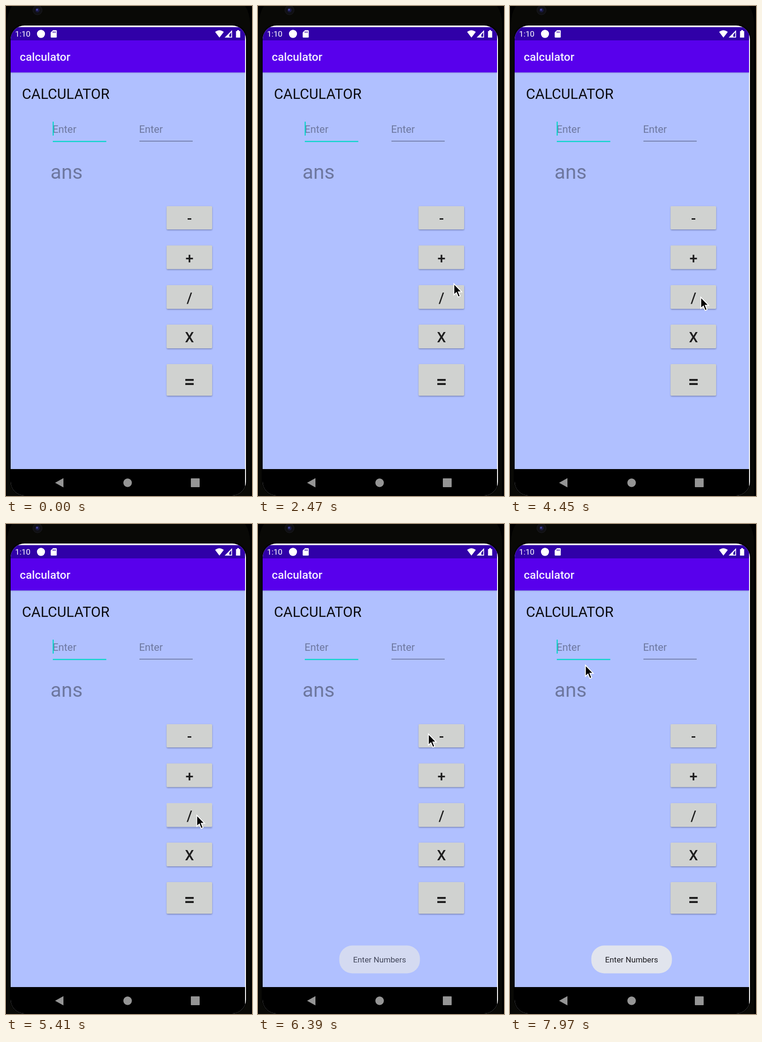
Animation, 531 px wide and 1055 px high, one loop 8 s. Source, as an HTML page:

```html
<!DOCTYPE html>
<html lang="en">
<head>
<meta charset="utf-8">
<title>Calculator demo</title>
<style>
  html, body { margin: 0; width: 100%; height: 100%; overflow: hidden; background: #000; }
  svg { display: block; width: 100vw; height: 100vh; }
  text { font-family: Roboto, "Noto Sans", sans-serif; }
  .medium { font-weight: 500; }
  .hint { fill: #6d779f; }
  .key { fill: #1d1d1d; font-weight: 500; text-anchor: middle; }
</style>
</head>
<body>
<svg viewBox="0 0 531 1055" preserveAspectRatio="none">
  <defs>
    <linearGradient id="barShade" x2="0" y2="1">
      <stop offset="0" stop-color="#4d5796" stop-opacity=".35"/>
      <stop offset="1" stop-color="#4d5796" stop-opacity="0"/>
    </linearGradient>
    <clipPath id="opening"><rect x="10" y="42" width="508" height="1012" rx="30"/></clipPath>
    <filter id="blur" x="-20%" y="-40%" width="140%" height="180%"><feGaussianBlur stdDeviation="1.5"/></filter>
  </defs>

  <!-- Phone body -->
  <rect width="531" height="1055" fill="#000"/>
  <path d="M2 1055V38Q3 14 13 0H516Q526 14 527 38V1055Z" fill="#090906"/>
  <rect x="8" y="39" width="512" height="1016" rx="32" fill="#000"/>
  <circle cx="68" cy="9" r="10" fill="#101014" stroke="#1b1b1e"/>
  <circle cx="68" cy="9" r="4.5" fill="#191944"/>
  <circle cx="67" cy="8" r="2" fill="#4a4ba4"/>

  <!-- The screen leaves a thin white gap at the top and right of the opening -->
  <g clip-path="url(#opening)">
    <rect x="10" y="42" width="508" height="1013" fill="#fff"/>
    <rect x="10" y="143" width="506" height="854" fill="#b0c0ff"/>
    <rect x="10" y="45.5" width="506" height="29" fill="#3000a8"/>
    <rect x="10" y="74" width="506" height="69" fill="#5800ec"/>
    <rect x="10" y="143" width="506" height="3" fill="url(#barShade)"/>
    <rect x="10" y="997" width="506" height="58" fill="#000"/>
  </g>

  <!-- Status bar -->
  <g fill="#fff">
    <text x="19.5" y="66.3" font-size="17.3">1:10</text>
    <circle cx="75.5" cy="60" r="8.7"/>
    <path d="M101.5 52H108Q109.5 52 109.5 53.5V66.5Q109.5 68 108 68H98Q96.5 68 96.5 66.5V57Z"/>
    <path d="M101.5 54.5V58M104 54.5V58M106.5 54.5V58" stroke="#3000a8" stroke-width="1.2"/>
    <path d="M451.5 56Q460.5 48.5 470 56L460.7 68Z"/>
    <path d="M472 68L488 52V68ZM482 62V66.3H486.3V56.5Z" fill-rule="evenodd"/>
    <path d="M496.5 54H499V52H503V54H505.5V68H496.5Z"/>
  </g>

  <text class="medium" x="29.8" y="118.3" font-size="24.6" fill="#f4efff">calculator</text>
  <text x="34.5" y="200.3" font-size="30.8" fill="#0b0b10">CALCULATOR</text>
  <text class="hint" x="100.5" y="273" font-size="22.2">Enter</text>
  <text class="hint" x="287.2" y="273" font-size="22.2">Enter</text>
  <text class="hint" x="96" y="372" font-size="43">ans</text>
  <rect x="101" y="290.5" width="115.5" height="2.4" fill="#08d6ca"/>
  <rect x="288" y="290.3" width="115" height="1.3" fill="#596283"/>
  <rect id="caret" x="100.7" y="249" width="2.3" height="30" fill="#08d6ca"/>

  <g id="keys"></g>

  <!-- Navigation bar -->
  <g fill="#959595">
    <path d="M106 1026.5L124 1016.5V1036.5Z"/>
    <circle cx="262.5" cy="1026.5" r="9.2"/>
    <rect x="399" y="1017" width="19" height="19" rx="1"/>
  </g>

  <g id="toast">
    <rect x="175.5" y="907.5" width="174" height="60" rx="28" fill="#e1e4ed"/>
    <text x="262.5" y="944" font-size="17.2" text-anchor="middle" fill="#1b1b20">Enter Numbers</text>
  </g>

  <path id="pointer" d="M.8 0V24L6.3 19L10.3 28.5L14.3 26.8L10.5 17.5H17.8Z"
        fill="#000" stroke="#fff" stroke-width="1.8"/>
</svg>
<script>
  const LOOP = 8000;
  const $ = id => document.getElementById(id);
  const clamp = v => Math.max(0, Math.min(1, v));
  const smooth = u => u * u * (3 - 2 * u);

  // label, top, height, baseline, font size
  const keys = [
    ['-', 431, 50, 468, 30.8],
    ['+', 515.5, 51, 553.5, 30.8],
    ['/', 601, 51, 638.5, 30.8],
    ['X', 686, 51, 724, 30.8],
    ['=', 771, 68, 823, 43]
  ];
  $('keys').innerHTML = keys.map(([label, y, h, base, size], i) => `
    <rect id="shade${i}" x="347" y="${y + 1.5}" width="98" height="${h}" rx="2"
          fill="#4a5580" opacity=".6" filter="url(#blur)"/>
    <rect x="346.5" y="${y}" width="98.5" height="${h}" rx="2" fill="#d0d2d0"/>
    <text class="key" x="396" y="${base}" font-size="${size}">${label}</text>`).join('');

  // Pointer stops: time, x, y
  const stops = [
    [1080, 488, 1060], [1490, 455, 718], [1650, 457, 705], [2470, 422, 598],
    [2900, 411, 627], [5600, 411, 627], [6300, 367, 452], [6500, 367, 452], [7850, 162, 304]
  ];

  function pointerAt(t) {
    const next = stops.findIndex(s => s[0] > t);
    if (next < 0) return stops[stops.length - 1].slice(1);
    const [a, b] = [stops[next - 1], stops[next]];
    const u = smooth((t - a[0]) / (b[0] - a[0]));
    return [a[1] + (b[1] - a[1]) * u, a[2] + (b[2] - a[2]) * u];
  }

  function draw(t) {
    const caretOff = t >= 50 && (t - 50) % 2800 < 1400;
    $('caret').style.display = caretOff ? 'none' : '';

    const shown = t >= stops[0][0];
    $('pointer').style.display = shown ? '' : 'none';
    if (shown) $('pointer').setAttribute('transform', `translate(${pointerAt(t)})`);

    // The divide key lifts while it is held: its shadow drops and softens.
    const lift = clamp((t - 5150) / 200) * clamp((5750 - t) / 250);
    $('shade2').setAttribute('y', 602.5 + 2 * lift);
    $('shade2').setAttribute('opacity', 0.6 - 0.25 * lift);

    const fade = clamp((t - 5900) / 1000);
    $('toast').setAttribute('opacity', 1 - (1 - fade) ** 2);
  }

  const start = performance.now();
  function tick() {
    draw((performance.now() - start) % LOOP);
    requestAnimationFrame(tick);
  }
  tick();
</script>
</body>
</html>
```
